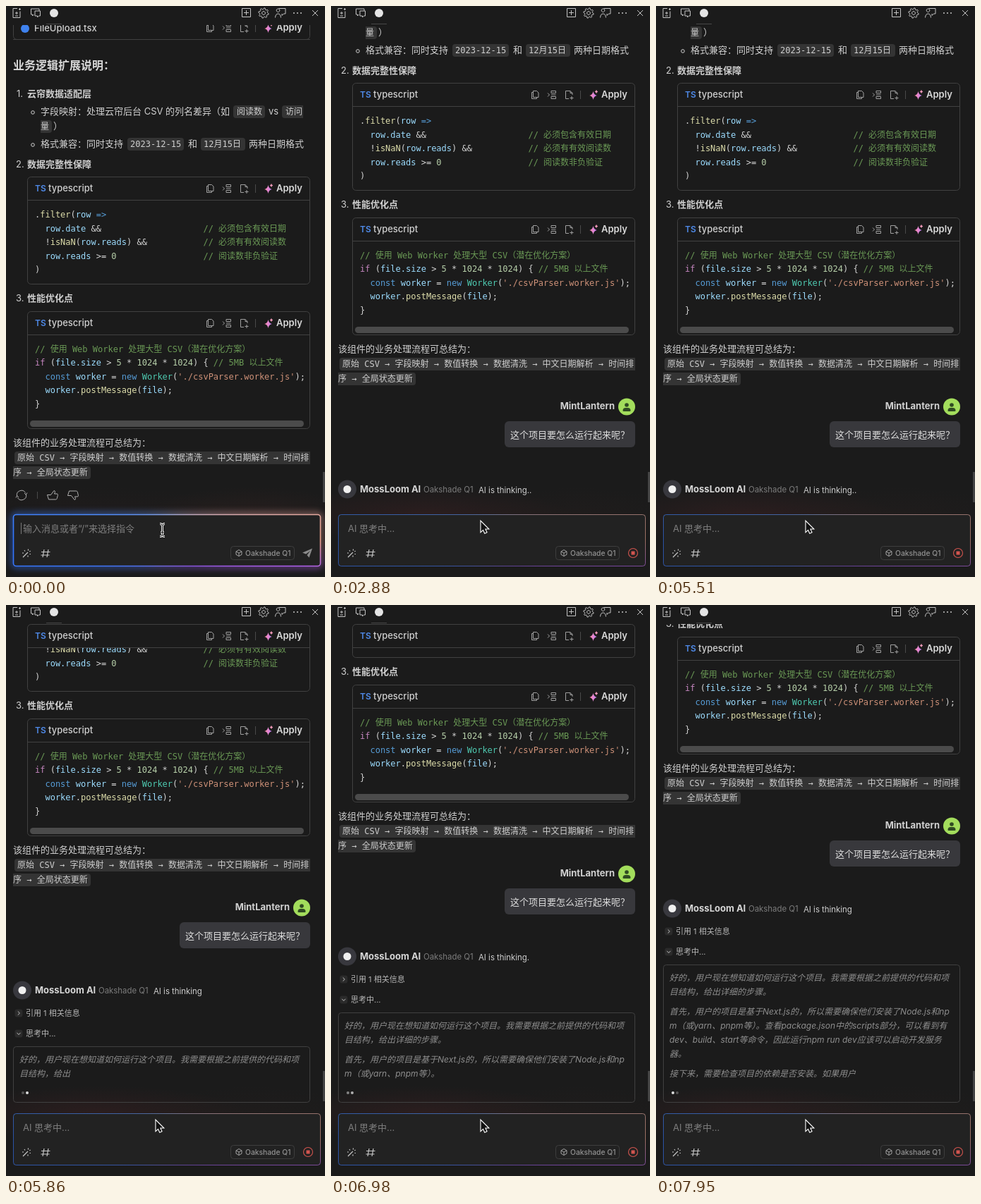
Recreate the animation shown at these times as an HTML page with a canvas. Size 452 by 810 pixels, loop 8000 ms.

```html
<!DOCTYPE html>
<html lang="zh-CN">
<head>
<meta charset="utf-8">
<title>AI chat panel</title>
<style>
html, body { margin: 0; width: 100%; height: 100%; overflow: hidden; background: #1b1b1b; }
canvas { display: block; width: 452px; height: 810px; }
</style>
</head>
<body>
<canvas id="stage"></canvas>
<script>
const W = 452, H = 810, LOOP = 8000, TOP = 27, BOTTOM = 708;
const SANS = "Inter, 'Noto Sans CJK SC', 'Noto Sans CJK', sans-serif";
const MONO = "'DejaVu Sans Mono', 'Noto Sans CJK SC', 'Noto Sans CJK', monospace";
const USER = 'MintLantern', BOT = 'MossLoom AI', MODEL = 'Oakshade Q1';
const QUESTION = '这个项目要怎么运行起来呢？';
const SENT = 1590, ANSWERED = 1650, CITED = 5560, THINKING = 5620, STREAM = 5692;

const canvas = document.getElementById('stage'), dpr = window.devicePixelRatio || 1;
canvas.width = W * dpr;
canvas.height = H * dpr;
const c = canvas.getContext('2d');

const gear = Array.from({ length: 32 }, (_, i) => {
  const r = i % 4 < 2 ? 7.2 : 5.4, a = (i + .5) * Math.PI / 16;
  return (i ? 'L' : 'M') + (r * Math.cos(a)).toFixed(2) + ' ' + (r * Math.sin(a)).toFixed(2);
}).join('') + 'ZM0-2.4A2.4 2.4 0 1 0 .01-2.4';

// icons, centred on 0,0
const ICONS = {
  copy: 'M-2.5-5.5H2.5L5-3V3.5H-2.5ZM-2.5-3.5H-4.5V5.5H2.5V3.5',
  insert: 'M-1-5.5H5.5V-2.5H-1ZM-1 2.5H5.5V5.5H-1ZM-6-2.5L-3.5 0-6 2.5M-1 0H5.5',
  newFile: 'M0 5.5H-4.5V-5.5H2L5-2.5V0M2-5.5V-2.5H5M4 2V7M1.5 4.5H6.5',
  star: 'M0-6Q.9-.9 5.2 0 .9.9 0 6-.9.9-5.2 0-.9-.9 0-6Z',
  refresh: 'M-6.5 1A6.5 6.5 0 0 1 5.5-3.5M6.5-1A6.5 6.5 0 0 1-5.5 3.5M8-3.5L6.3-.8 4-3M-8 3.5L-6.3.8-4 3',
  thumb: 'M-7.5-.5L-5.5 6H4.5Q6 6 6.3 4.5L7.5-.5Q7.5-2 6-2H2.5L3.5-4.5Q3.5-6.5 2-6.5L-2.5-.5Z',
  note: 'M1-6.5H-5V6.5H5V-2.5M-2 0H2M0-2V2M-2 4H2M3-5.5H6M4.5-7V-4',
  chat: 'M5-3V-6H-6.5V2H-4.5V4L-2.5 2M-1-3H6.5V4H4.5L2.5 6V4H-1Z',
  add: 'M-6-6H6V6H-6ZM-3.5 0H3.5M0-3.5V3.5',
  gear,
  person: 'M-3.5-1.5A2.3 2.3 0 1 0-3.51-1.5M-7.5 6.5Q-7 1-3.5 1T.5 6.5M-2.5-6.5H7V1H4.5L2 3.5V1',
  close: 'M-4-4L4 4M4-4L-4 4',
  wand: 'M-5 5.5L2-1.5M2.5-6V-4M-3-4.5L-2-3M5.5-3.5L4.5-2.5M4.5 1H6M2 3V5M-6-.5H-4',
  hash: 'M-2-5.5L-4 5.5M4-5.5L2 5.5M-6-2H6.5M-6.5 2.5H5.5',
  plane: 'M7-6.5L2.5 6.5-.5 3 4-3-2 1.5-7-.5Z',
  cube: 'M0-4.5L4-2.2V2.2L0 4.5-4 2.2V-2.2ZM-4-2.2L0 0 4-2.2M0 0V4.5',
  right: 'M-1.2-2.5L1.5 0-1.2 2.5',
  down: 'M-2.5-1.2L0 1.5 2.5-1.2',
  arrow: 'M0 0V14L3.2 11 5.5 16 7.8 15 5.5 10H10Z',
  beam: 'M-3.5-9Q0-9 0-6V6Q0 9-3.5 9M3.5-9Q0-9 0-6M0 6Q0 9 3.5 9M-2.5 3H2.5'
};

const INK = {
  w: '#d4d4d4', b: '#9cdcfe', k: '#569cd6', p: '#c586c0', y: '#dcdcaa',
  t: '#4ec9b0', s: '#ce9178', n: '#b5cea8', c: '#6a9955'
};
// "~x" switches to ink x
const FILTER = [
  '~w.~yfilter~w(~brow ~k=>',
  '~w  ~brow.date ~w&&' + ' '.repeat(20) + '~c// 必须包含有效日期',
  '~w  !~yisNaN~w(~brow.reads~w) &&' + ' '.repeat(11) + '~c// 必须有有效阅读数',
  '~w  ~brow.reads ~w>= ~n0' + ' '.repeat(17) + '~c// 阅读数非负验证',
  '~w)'
];
const WORKER = [
  '~c// 使用 Web Worker 处理大型 CSV（潜在优化方案）',
  '~pif ~w(~bfile.size ~w> ~n5 ~w* ~n1024 ~w* ~n1024~w) { ~c// 5MB 以上文件',
  "~w  ~kconst ~bworker ~w= ~knew ~tWorker~w(~s'./csvParser.worker.js'~w);",
  '~w  ~bworker~w.~ypostMessage~w(~bfile~w);',
  '~w}'
];
const THOUGHT = [
  ['好的，用户现在想知道如何运行这个项目。我需要根据之前提供的代码和项', '目结构，给出详细的步骤。'],
  ['首先，用户的项目是基于Next.js的，所以需要确保他们安装了Node.js和np',
   'm（或yarn、pnpm等）。查看package.json中的scripts部分，可以看到有',
   'dev、build、start等命令，因此运行npm run dev应该可以启动开发服务', '器。'],
  ['接下来，需要检查项目的依赖是否安装。如果用户']
];
const TOTAL = THOUGHT.flat().join('').length;
// time and characters written by then
const PACE = [[5680, 0], [5860, 39], [6980, 101], [7932, TOTAL]];

function text(str, x, y, size = 13, color = '#d0d0d0', style = '', family = SANS) {
  c.font = `${style} ${size}px ${family}`;
  c.fillStyle = color;
  c.fillText(str, x, Math.round(y + size * .33));
  return c.measureText(str).width;
}

function icon(name, x, y, { color = '#b0b0b0', fill = false, width = 1, sx = 1, sy = 1 } = {}) {
  const path = new Path2D(ICONS[name]);
  c.save();
  c.translate(x, y);
  c.scale(sx, sy);
  c.lineWidth = width;
  c.fillStyle = c.strokeStyle = color;
  fill ? c.fill(path) : c.stroke(path);
  c.restore();
}

function disc(x, y, r, color) {
  c.fillStyle = color;
  c.beginPath();
  c.arc(x, y, r, 0, 7);
  c.fill();
}

function box(x, y, w, h, r, fill, stroke, width = 1) {
  c.beginPath();
  c.roundRect(x, y, w, h, r);
  if (fill) { c.fillStyle = fill; c.fill(); }
  if (stroke) { c.strokeStyle = stroke; c.lineWidth = width; c.stroke(); }
}

function rect(x, y, w, h, color) {
  c.fillStyle = color;
  c.fillRect(x, y, w, h);
}

function chip(str, x, y, w, r = 4, pad = 4) {
  box(x, y - 9, w, 18, r, '#343434');
  text(str, x + pad, y, 12, '#cfcfcf', '', MONO);
}

function within(x, y, w, h, draw) {
  c.save();
  c.beginPath();
  c.rect(x, y, w, h);
  c.clip();
  draw();
  c.restore();
}

function codeLine(line, x, y) {
  for (const part of line.split('~').slice(1))
    x += text(part.slice(1), x, y, 12, INK[part[0]], '', MONO);
}

// a code block whose header sticks to the top of the view
function block(x, top, bottom, label, lines) {
  if (bottom < TOP) return;
  const head = Math.round(Math.min(Math.max(top, TOP), bottom - 34)), y = head + 17;
  within(x, head + 34, 432 - x, bottom - head - 34, () => {
    lines.forEach((line, i) => codeLine(line, 41, top + 54 + i * 19.5));
    if (lines === WORKER) box(34, bottom - 12, 388, 9, 4.5, '#4b4b4b');
  });
  box(x + .5, head + .5, 430 - x, bottom - head - 1, 5, null, '#414141');
  rect(x, head + 33, 431 - x, 1, '#414141');
  label(y);
  for (const [i, name] of ['copy', 'insert', 'newFile'].entries())
    icon(name, 289 + i * 24, y, { color: '#a0a0a0' });
  rect(353, y - 6, 1, 12, '#4a4a4a');
  const glow = c.createLinearGradient(-5, 0, 5, 0);
  glow.addColorStop(0, '#ff8fa3');
  glow.addColorStop(1, '#c77dff');
  icon('star', 371.5, y + 1, { color: glow, fill: true });
  icon('star', 376, y - 4.5, { color: '#ff9fc0', fill: true, sx: .45, sy: .45 });
  text('Apply', 383, y, 13, '#dadada', '600');
}

function tsLabel(y) {
  text('TS', 41, y, 12, '#4f8ae8', '600');
  text('typescript', 60, y, 13, '#d0d0d0', '500');
}

function fileLabel(y) {
  disc(27, y + 1, 6, '#3f82ee');
  text('FileUpload.tsx', 40, y + 1, 13, '#d0d0d0', '500');
}

function article(s, t) {
  const put = (str, x, y, style) => text(str, x, y - s, 13, '#d0d0d0', style);
  const tag = (str, x, y, w, r, pad) => chip(str, x, y - s, w, r, pad);
  const ring = y => { c.beginPath(); c.arc(38, y - s, 2.3, 0, 7); c.strokeStyle = '#d0d0d0'; c.lineWidth = 1; c.stroke(); };

  block(10, -100 - s, 48 - s, fileLabel, []);
  text('业务逻辑扩展说明：', 10, 85 - s, 16, '#d8d8d8', '600');
  put('1.', 15, 125);
  put('云帘数据适配层', 30, 125, '600');
  ring(151);
  put('字段映射：处理云帘后台 CSV 的列名差异（如', 49, 150);
  tag('阅读数', 322, 150, 45, 4, 5);
  put('vs', 372, 150);
  tag('访问', 391, 150, 30, [4, 0, 0, 4], 5);
  tag('量', 49, 171, 16, [0, 4, 4, 0], 0);
  put('）', 67, 171);
  ring(197);
  put('格式兼容：同时支持', 49, 196);
  tag('2023-12-15', 172, 196, 80);
  put('和', 258, 196);
  tag('12月15日', 276, 196, 63);
  put('两种日期格式', 344, 196);
  put('2.', 14, 225);
  put('数据完整性保障', 30, 225, '600');
  block(30, 242.2 - s, 395 - s, tsLabel, FILTER);
  put('3.', 14, 415);
  put('性能优化点', 30, 415, '600');
  block(30, 433 - s, 600 - s, tsLabel, WORKER);
  put('该组件的业务处理流程可总结为：', 10, 620);
  tag('原始 CSV → 字段映射 → 数值转换 → 数据清洗 → 中文日期解析 → 时间排', 12, 641, 419, [4, 0, 0, 4]);
  tag('序 → 全局状态更新', 10, 662, 110, [0, 4, 4, 0], 0);
  if (t < SENT) {
    icon('refresh', 22, 694);
    rect(44, 689, 1, 10, '#4a4a4a');
    icon('thumb', 66, 694);
    icon('thumb', 95, 694, { sy: -1 });
  }
}

function question(s) {
  const y = 701 - s;
  c.textAlign = 'right';
  text(USER, 402, y, 13, '#d0d0d0', '700');
  c.textAlign = 'left';
  disc(419, y + .6, 12, '#a3dd5c');
  disc(419, y - 2, 2.8, '#2f4a22');
  box(413.5, y + 2, 11, 5, [4, 4, 1, 1], '#2f4a22');
  box(246, y + 21, 185, 37, 6, '#38383c');
  text(QUESTION, 254, y + 41, 13, '#dedede');
}

function reply(s, t, shown) {
  const y = 818.5 - s;
  disc(23, y, 13, '#38383e');
  disc(23, y, 5.5, '#f0f0f0');
  text(BOT, 41, y, 13, '#d6d6d6', '700');
  text(MODEL, 131, y + .5, 11.4, '#7c7c7c');
  const dots = (Math.floor((t - 2842) / (400 / 3)) + 402) % 4;
  text('AI is thinking' + '.'.repeat(dots), 209, y + 1.5, 11.4, '#cfcfcf');

  const fold = (name, str, fy) => {
    box(12.5, fy - 5.5, 11, 11, 3, '#2b2b2b');
    icon(name, 18, fy, { color: '#c0c0c0' });
    text(str, 28, fy, 11, '#b8b8b8');
  };
  if (t >= CITED) fold('right', '引用 1 相关信息', 851 - s);
  if (t >= THINKING) fold('down', '思考中...', 880 - s);
  if (!shown.length) return;

  const top = 898 - s;
  box(10.5, top + .5, 420, 706 - top - 1, 4, null, '#404040');
  for (const line of shown) text(line.str, 19, top + 19 + line.y, 12, '#8e8e8e', 'italic');
  const wave = Math.cos((t - 5860) / 1400 * 2 * Math.PI);
  disc(24, 692, 2, `rgba(220,220,220,${.65 - .35 * wave})`);
  disc(30, 692, 2, `rgba(220,220,220,${.65 + .35 * wave})`);
}

// lines of the thought streamed so far, with their offsets
function streamed(t) {
  if (t < STREAM) return [];
  const now = 5860 + Math.floor((t - 5860) / 56) * 56;
  let left = TOTAL;
  for (let i = PACE.length - 1; i > 0; i--) {
    const [t0, n0] = PACE[i - 1], [t1, n1] = PACE[i];
    if (now < t1) left = Math.round(n0 + (n1 - n0) * (now - t0) / (t1 - t0));
  }
  const out = [];
  let y = 0;
  for (const para of THOUGHT) {
    for (const line of para) {
      if (left <= 0) return out;
      out.push({ str: line.slice(0, left), y });
      left -= line.length;
      y += 20;
    }
    y += 8;
  }
  return out;
}

function scrollAt(t, shown) {
  if (t < SENT) return 0;
  if (t < ANSWERED) return 67;
  if (t < CITED) return 133;
  if (t < THINKING) return 160;
  return shown.length ? 252 + shown.at(-1).y : 189;
}

function toolbar() {
  const color = '#c4c4c4';
  icon('note', 15, 10, { color });
  icon('chat', 42, 10, { color });
  disc(68, 10, 6, '#e4e4e4');
  rect(57, 25, 22, 1, '#484848');
  icon('add', 340.5, 9.5, { color });
  icon('gear', 365, 10, { color });
  icon('person', 389, 10, { color });
  for (const x of [408, 413, 418]) disc(x, 10, 1, color);
  icon('close', 438, 10, { color });
}

function haze(x, y, rx, ry, rgb, alpha) {
  c.save();
  c.translate(x, y);
  c.scale(rx, ry);
  const g = c.createRadialGradient(0, 0, 0, 0, 0, 1);
  g.addColorStop(0, `rgba(${rgb},${alpha})`);
  g.addColorStop(1, `rgba(${rgb},0)`);
  c.fillStyle = g;
  c.fillRect(-1, -1, 2, 2);
  c.restore();
}

function inputBox(t) {
  const busy = t >= SENT, typed = t >= 710;
  const rim = c.createConicGradient(0, 228, 758);
  const hues = [[0, '#f0a48c'], [.03, '#b060f0'], [.12, '#8a55e0'], [.3, '#6c6ce0'], [.46, '#3a78ff'],
    [.5, '#2f74ff'], [.55, '#4c8cff'], [.75, '#8fa4dc'], [.96, '#e0aaa8'], [1, '#f0a48c']];
  hues.forEach(([at, hue]) => rim.addColorStop(at, hue));

  if (!busy) {
    c.save();
    c.filter = 'blur(5px)';
    c.globalAlpha = .65;
    box(10, 721, 436, 74, 5, null, rim, 5);
    c.restore();
  }
  box(10, 721, 436, 74, 4, '#222222');
  c.globalAlpha = busy ? .6 : 1;
  box(10.5, 721.5, 435, 73, 4, null, rim, busy ? 1 : 1.6);
  c.globalAlpha = 1;

  if (busy) text('AI 思考中...', 24, 742, 13, '#7e7e7e');
  else if (typed) text(QUESTION, 21, 742, 13, '#ececec');
  else text('输入消息或者“/”来选择指令', 24, 742, 13, '#7e7e7e');
  const caretOff = (t >= 60 && t < 360) || (t >= 1130 && t < 1420);
  if (!busy && !caretOff) rect(typed ? 190 : 21, 733, 1, 16, t < 60 ? '#7a7a7a' : '#4a8cff');

  icon('wand', 29, 776.5, { color: '#c8c8c8', width: 1.2 });
  icon('hash', 56, 776.5, { color: '#c8c8c8', width: 1.2 });
  box(318.5, 766.5, 90, 19, 4, null, '#3e3e3e');
  icon('cube', 330, 776, { color: '#a0a0a0' });
  text(MODEL, 339, 776.5, 10.3, '#929292', '500');
  if (busy) {
    c.beginPath();
    c.arc(428, 776, 6.5, 0, 7);
    c.strokeStyle = '#d2554f';
    c.lineWidth = 1.1;
    c.stroke();
    rect(425.5, 773.5, 5, 5, '#d2554f');
  } else icon('plane', 427, 776, { color: typed ? '#f2f2f2' : '#8c8c8c', fill: true });
}

function pointer(t) {
  if (t >= SENT) {
    icon('arrow', 212.5, 731.5, { color: '#ffffff', width: 2.2 });
    icon('arrow', 212.5, 731.5, { color: '#111111', fill: true });
    return;
  }
  const k = Math.min(Math.max((t - 1130) / 50, 0), 1);
  icon('beam', 221.5 - 8 * k, 743.5 - 10 * k, { color: '#f4f4f4', width: 3 });
  icon('beam', 221.5 - 8 * k, 743.5 - 10 * k, { color: '#1a1a1a', width: 1 });
}

function draw() {
  const t = performance.now() % LOOP;
  const shown = streamed(t), s = scrollAt(t, shown);
  c.setTransform(dpr, 0, 0, dpr, 0, 0);
  rect(0, 0, W, H, '#1b1b1b');
  haze(130, 722, 210, 40, '110,40,45', t < SENT ? .06 : .2);
  haze(350, 722, 150, 40, '110,50,45', t < SENT ? .14 : .05);
  toolbar();
  within(0, TOP, W, BOTTOM - TOP, () => {
    article(s, t);
    if (t >= SENT) question(s);
    if (t >= ANSWERED) reply(s, t, shown);
    rect(449, 661, 3, 43, '#454545');
  });
  inputBox(t);
  pointer(t);
  requestAnimationFrame(draw);
}
draw();
</script>
</body>
</html>
```
